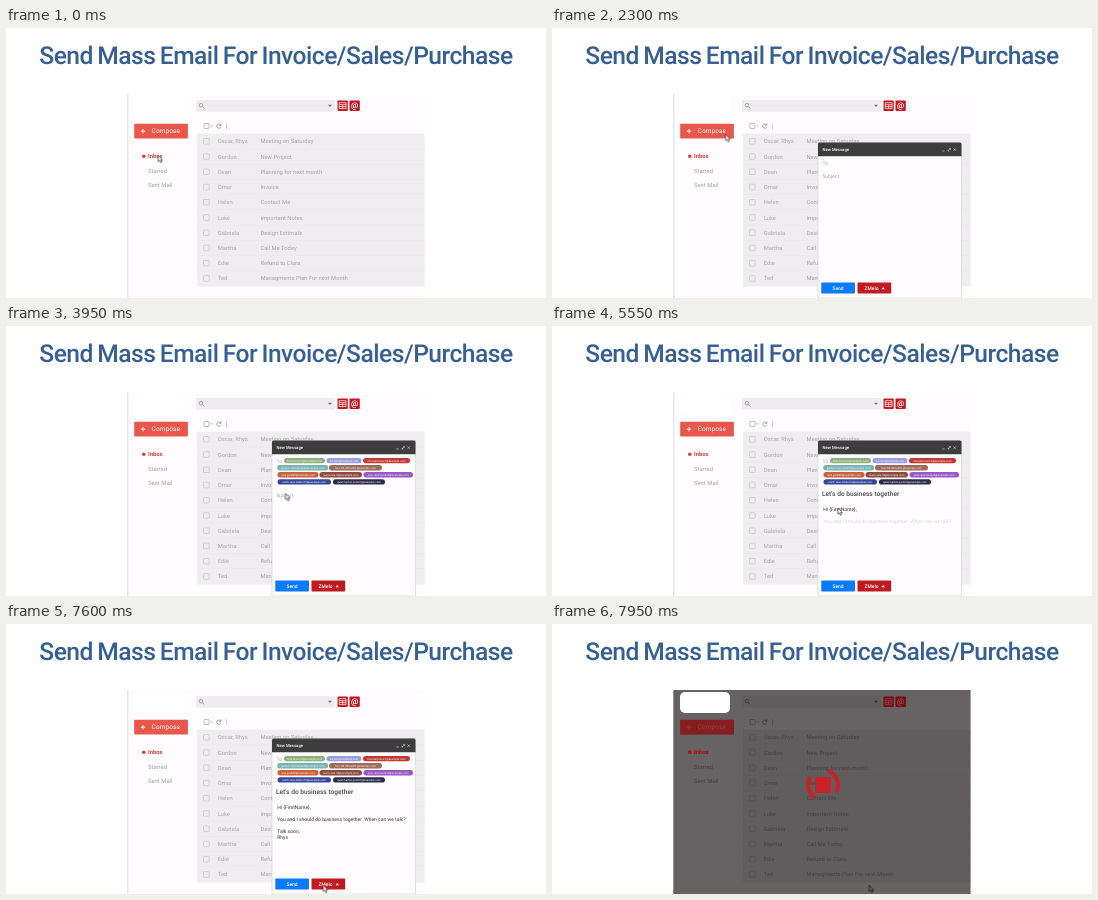
An HTML page that plays this animation: 540 by 270 pixels, repeating every 8000 ms.

```html
<!DOCTYPE html>
<html lang="en">
<head>
<meta charset="utf-8">
<title>Mass email</title>
<style>
html, body { margin: 0; width: 100%; height: 100%; overflow: hidden; background: #fff; }
svg { display: block; width: 540px; height: 270px; }
text { font-family: Roboto, Arial, sans-serif; text-rendering: geometricPrecision; white-space: pre; }
g, rect { transform-box: view-box; }
</style>
</head>
<body>
<svg id="stage" viewBox="0 0 540 270"></svg>
<script>
const LOOP = 8000;
const NS = 'http://www.w3.org/2000/svg';
const stage = document.getElementById('stage');

function add(parent, tag, attrs = {}, content) {
  const el = document.createElementNS(NS, tag);
  for (const key in attrs) el.setAttribute(key, attrs[key]);
  if (content !== undefined) el.textContent = content;
  parent.append(el);
  return el;
}
const group = (parent, attrs) => add(parent, 'g', attrs);
const box = (parent, x, y, width, height, fill, rx = 0, more = {}) =>
  add(parent, 'rect', { x, y, width, height, fill, rx, ...more });
const label = (parent, x, y, size, fill, content, weight = 400, more = {}) =>
  add(parent, 'text', { x, y, 'font-size': size, fill, 'font-weight': weight, ...more }, content);
const line = (parent, d, stroke, width, more = {}) =>
  add(parent, 'path', { d, stroke, 'stroke-width': width, fill: 'none', ...more });

// steps: [ms, value, easing to the next step]
function play(el, prop, steps) {
  const last = steps[steps.length - 1];
  const all = [...steps];
  if (all[0][0] > 0) all.unshift([0, all[0][1]]);
  if (last[0] < LOOP) all.push([LOOP, last[1]]);
  return el.animate(
    all.map(([ms, value, easing = 'linear']) => ({ offset: ms / LOOP, [prop]: value, easing })),
    { duration: LOOP, iterations: Infinity });
}
const HOLD = 'step-end', EASE = 'ease-in-out';
const fade = (el, from, to) => play(el, 'opacity', [[from, 0], [to, 1]]);
const cutAt = (el, ms, before, after) => play(el, 'opacity', [[0, before, HOLD], [ms, after]]);
const press = (el, x, y, start, mid, end) => {
  el.style.transformOrigin = `${x}px ${y}px`;
  play(el, 'transform', [[start, 'scale(1)', EASE], [mid, 'scale(.965)', EASE], [end, 'scale(1)']]);
};

// Heading and card
label(stage, 270, 36, 24.6, '#365f92', 'Send Mass Email For Invoice/Sales/Purchase', 500,
  { 'text-anchor': 'middle', 'letter-spacing': -0.51, 'word-spacing': -1.3 });
box(stage, 121.4, 66, 297.2, 204, '#fefcfe');
box(stage, 121.4, 66, 0.8, 204, '#d8d6d8');

// Search bar and its buttons
const ICONS = [331.5, 343.5];
const iconBox = (parent, x, more) => box(parent, x, 72.4, 10.3, 10.5, '#c4171d', 0.8, more);
box(stage, 190, 72, 139, 11.6, '#efecef');
add(stage, 'circle', { cx: 195, cy: 77.2, r: 1.8, fill: 'none', stroke: '#8c8a8c', 'stroke-width': 0.7 });
line(stage, 'M196.3 78.5l2 2', '#8c8a8c', 0.8);
add(stage, 'path', { d: 'M322 76.8h4l-2 2.2z', fill: '#777' });
for (const x of ICONS) iconBox(stage, x);
line(stage, 'M333.2 74.7h6.8v5.9h-6.8zM333.2 76.7h6.8M333.2 78.6h6.8M336.6 76.7v3.9', '#fff', 0.7);
label(stage, 348.6, 80.1, 8, '#fff', '@', 700, { 'text-anchor': 'middle' });

// Toolbar
box(stage, 198, 95.5, 5, 5, 'none', 0.5, { stroke: '#a8a6a8', 'stroke-width': 0.7 });
add(stage, 'path', { d: 'M204.4 97.4h2.4l-1.2 1.4z', fill: '#a8a6a8' });
line(stage, 'M214.6 97A2.1 2.1 0 1 0 214.8 98.9M215 95.5v1.9h-2', '#8c8a8c', 0.7);
for (const y of [96, 98, 100]) add(stage, 'circle', { cx: 220.5, cy: y, r: 0.5, fill: '#8c8a8c' });

// Inbox list
box(stage, 191, 105.6, 227.6, 152.2, '#f0edf0');
const mails = [
  ['Oscar, Rhys', 'Meeting on Saturday'], ['Gordon', 'New Project'],
  ['Dean', 'Planning for next month'], ['Omar', 'Invoice'],
  ['Helen', 'Contact Me'], ['Luke', 'Important Notes'],
  ['Gabriela', 'Design Estimate'], ['Martha', 'Call Me Today'],
  ['Edie', 'Refund to Clara'], ['Ted', 'Managments Plan For next Month']
];
mails.forEach(([who, what], i) => {
  const y = 113.3 + 15.24 * i;
  box(stage, 191, y + 7.3, 227.6, 0.6, '#e9e6e9');
  box(stage, 197.6, y - 2.8, 5.6, 5.6, 'none', 0.5, { stroke: '#c8c6c8', 'stroke-width': 0.7 });
  label(stage, 211.8, y + 2, 5.8, '#aaa8aa', who);
  label(stage, 254.4, y + 2, 5.8, '#a6a4a6', what);
});

// Sidebar
const compose = group(stage);
const composeBox = (parent, fill, more) => box(parent, 128.2, 95.8, 53.7, 14.7, fill, 0.8, more);
composeBox(compose, '#e8574b');
line(compose, 'M134.8 103.2h4.4M137 101v4.4', '#fff', 0.9);
label(compose, 145.6, 105.4, 6.5, '#fff', 'Compose', 400, { 'letter-spacing': 0.1 });
press(compose, 155, 103, 1100, 1300, 1500);
function inbox(parent, fill, more) {
  const g = group(parent, more);
  add(g, 'circle', { cx: 137.8, cy: 128.2, r: 1.8, fill });
  label(g, 142, 130.2, 5.9, fill, 'Inbox', 700);
}
inbox(stage, '#db413a');
label(stage, 142, 144.6, 5.9, '#a4a2a4', 'Starred');
label(stage, 142, 159, 5.9, '#a4a2a4', 'Sent Mail');

// Message window
const win = group(stage);
play(win, 'opacity', [[1500, 0], [1800, 1], [7650, 1], [7850, 0]]);
play(win, 'transform', [[1500, 'translateY(20px)', 'ease-out'], [1850, 'translateY(0)']]);
box(win, 266, 114.5, 143.5, 155.5, '#fefcfe', 0, { stroke: '#d2d0d2', 'stroke-width': 0.6 });
add(win, 'path', { d: 'M266 128.2v-12.2q0-1.5 1.5-1.5h140.5q1.5 0 1.5 1.5v12.2z', fill: '#3d3d3d' });
label(win, 270.5, 123.2, 4.2, '#fff', 'New Message', 500);
line(win, 'M390.2 123h2.6M396 123l2.3-2.3M397 120.5h1.5v1.5M396 121.8v1.3h1.3M401.5 120.4l2.5 2.5M404 120.4l-2.5 2.5', '#e8e8e8', 0.5);
label(win, 270.4, 136.8, 5, '#aaa', 'To');

const hint = label(win, 270.4, 149.6, 5, '#aaa', 'Subject');
play(hint, 'transform', [[2900, 'translateY(0)', EASE], [3450, 'translateY(21.2px)']]);
cutAt(hint, 4100, 1, 0);

// Recipients: x, row, width, colour, address
const chips = [
  [278, 0, 41, '#8db17e', 'lena.moss12@example.com'], [320.5, 0, 35, '#9a9fdc', 'ivo.tarn@example.com'],
  [357, 0, 47, '#c23838', 'rita.bell.home7@example.com'], [271.2, 1, 51, '#79b5b1', 'garden.mail.desk40@example.com'],
  [323, 1, 53, '#9d6b57', 'fern.hill.office201@example.com'], [271.5, 2, 41, '#cb6139', 'noel.park88@example.com'],
  [313.5, 2, 42.5, '#8f4b3b', 'team.vale.34@example.com'], [357.5, 2, 49.5, '#9a57c6', 'june.reed.studio5@example.com'],
  [271.5, 3, 53.5, '#35489b', 'north.lane.letters72@example.com'], [327, 3, 52, '#2d2b4b', 'quiet.harbor.post63@example.com']
];
chips.forEach(([x, row, width, fill, address], i) => {
  const chip = group(win);
  const y = 131.9 + 7.1 * row;
  box(chip, x, y, width, 5.4, fill, 2.7);
  label(chip, x + width / 2, y + 3.6, 2.8, '#fff', address, 400, { 'text-anchor': 'middle' });
  fade(chip, 2900 + 62 * i, 3020 + 62 * i);
});

// Subject and body
const SUBJECT = "Let's do business together";
const subject = label(win, 270, 170.4, 6.6, '#4a494a', '', 500);
const body = [
  [184.7, 'Hi {FirstName},', 5150, 5550],
  [196.7, 'You and I should do business together. When can we talk?', 5500, 5800],
  [208.8, 'Talk soon,', 5600, 5900],
  [214.8, 'Rhys', 5600, 5900]
];
for (const [y, words, from, to] of body) fade(label(win, 271.2, y, 5, '#333', words), from, to);

// Buttons
box(win, 269.3, 254.4, 33.7, 11.2, '#0a7bff', 0.8);
label(win, 286, 261.8, 4.9, '#fff', 'Send', 500, { 'text-anchor': 'middle' });
const bulk = group(win);
box(bulk, 305.5, 254.4, 33.7, 11.2, '#bf1c22', 0.8);
label(bulk, 312.6, 261.8, 4.9, '#fff', 'ZMelo', 500);
add(bulk, 'path', { d: 'M329.6 261.3h3.2l-1.6-2.2z', fill: '#fff' });
press(bulk, 322, 260, 6850, 7050, 7300);

// Pointer
const pointer = group(stage);
add(pointer, 'path', {
  d: 'M0 0V6.2L1.5 4.9L2.6 7.3L3.8 6.7L2.7 4.5H4.6Z',
  fill: '#fff', stroke: '#333', 'stroke-width': 0.7, 'stroke-linejoin': 'round'
});
const at = (x, y) => `translate(${x}px, ${y}px)`;
const move = play(pointer, 'transform', [
  [0, at(152, 127.5), EASE], [900, at(173.6, 106.5)],
  [2350, at(173.6, 106.5), EASE], [2750, at(274, 133.5)],
  [3600, at(274, 133.5), EASE], [3950, at(279.5, 167.5)],
  [5050, at(279.5, 167.5), EASE], [5500, at(285.8, 182)],
  [5650, at(285.8, 182), EASE], [6350, at(317.2, 261.3)]
]);

// Dimmed card
const dim = group(stage);
box(dim, 121.4, 66, 297.2, 204, '#0a0406', 0, { opacity: 0.62 });
composeBox(dim, '#c4171d', { opacity: 0.38 });
for (const x of ICONS) iconBox(dim, x, { opacity: 0.35 });
inbox(dim, '#d01a1c', { opacity: 0.7 });
cutAt(dim, 7650, 0, 1);
box(stage, 128, 68, 50, 21, '#fff', 5);

// Loader
const loader = group(stage);
cutAt(loader, 7700, 0, 1);
const ring = group(loader);
ring.style.transformOrigin = '271px 161px';
const point = deg => {
  const a = deg * Math.PI / 180;
  return `${271 + 15 * Math.cos(a)} ${161 + 15 * Math.sin(a)}`;
};
for (const [from, to] of [[-70, 28], [122, 212]])
  line(ring, `M${point(from)}A15 15 0 0 1 ${point(to)}`, '#cc2027', 4);
play(ring, 'transform', [[7650, 'rotate(-110deg)'], [7950, 'rotate(0deg)'], [8000, 'rotate(18deg)']]);
box(loader, 263, 153, 16, 16, '#cc2027', 2.5);

function type() {
  const t = (move.currentTime || 0) % LOOP;
  const count = Math.max(0, Math.min(SUBJECT.length, Math.floor((t - 4100) / 27)));
  subject.textContent = SUBJECT.slice(0, count);
  requestAnimationFrame(type);
}
type();
</script>
</body>
</html>
```
